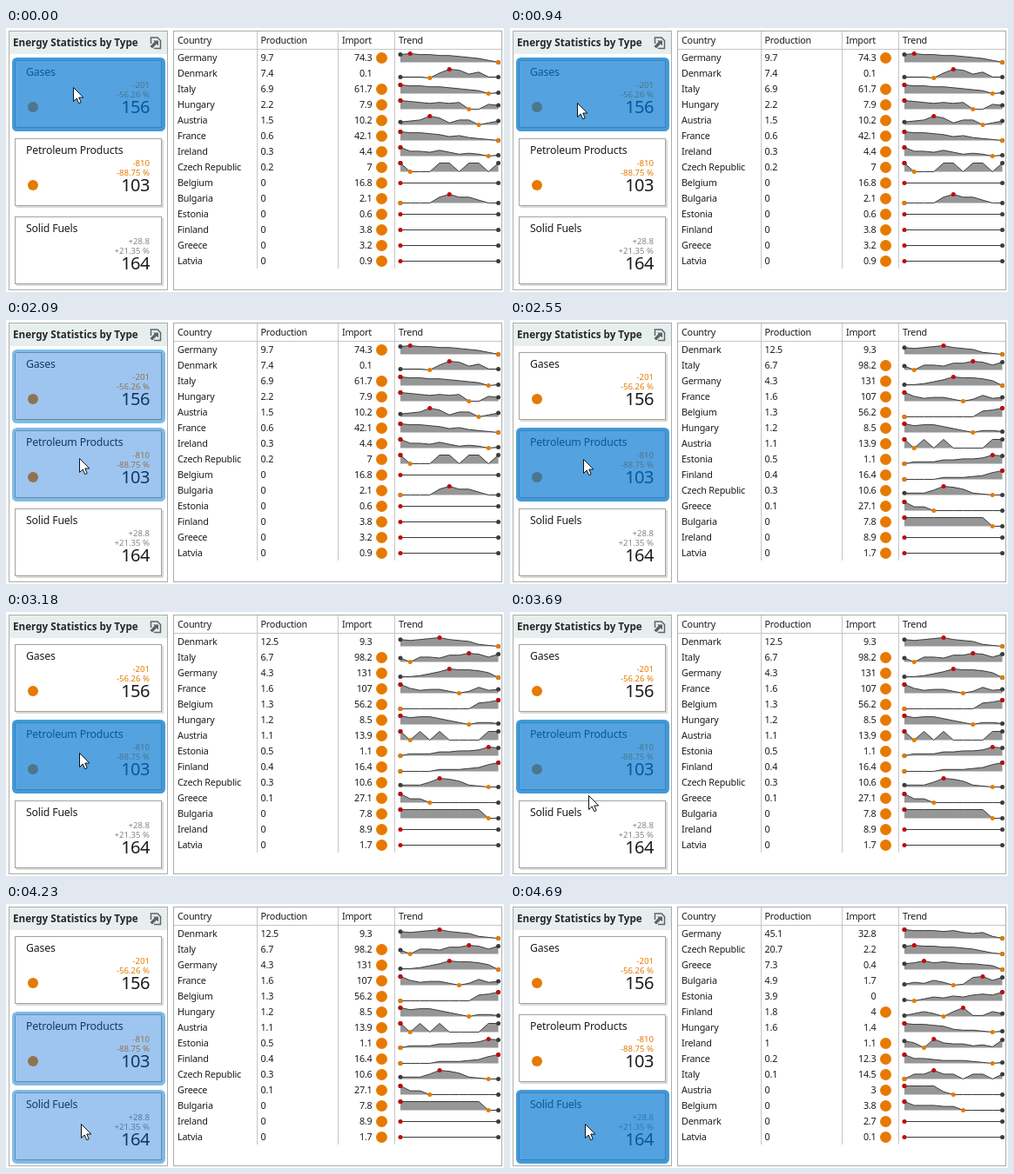
An HTML page for the animation above (6.39 s loop, 572 by 304 pixels).

```html
<!DOCTYPE html>
<html lang="en">
<head>
<meta charset="utf-8">
<title>Energy Statistics by Type</title>
<style>
  html, body { margin: 0; width: 100%; height: 100%; overflow: hidden; background: #fff; }
  svg { display: block; }
  text { font: 10.8px "Noto Sans", "Open Sans", sans-serif; letter-spacing: -.22px; fill: #1c1c1c; }
  .end { text-anchor: end; }
  .head { font-size: 11.65px; font-weight: bold; letter-spacing: 0; fill: #262829; }
  .name { font-size: 12.3px; letter-spacing: -.18px; }
  .delta { font-size: 9.6px; letter-spacing: 0; }
  .total { font-size: 20px; letter-spacing: -.5px; }
  .grid { fill: none; stroke: #c6c6c6; shape-rendering: crispEdges; }
  .panel { fill: none; stroke: #a9adab; shape-rendering: crispEdges; }
</style>
</head>
<body>
<svg id="stage" width="572" height="304" viewBox="0 0 572 304"></svg>
<script>
const LOOP = 6390, ORANGE = '#e67a00', RED = '#c00b0b', DARK = '#3b3b3b';

const cards = [
  ['Gases', '-201', '-56.26 %', 156],
  ['Petroleum Products', '-810', '-88.75 %', 103],
  ['Solid Fuels', '+28.8', '+21.35 %', 164],
];

// country | production | import (* = marked) | trend, one digit per year
const tables = [`
Germany|9.7|74.3*|89887765420
Denmark|7.4|0.1|11105984611
Italy|6.9|61.7*|98877654301
Hungary|2.2|7.9*|98767670054
Austria|1.5|10.2*|34597255024
France|0.6|42.1*|98876453210
Ireland|0.3|4.4*|95546423201
Czech Republic|0.2|7*|90009909909
Belgium|0|16.8*|
Bulgaria|0|2.1*|00006966300
Estonia|0|0.6*|
Finland|0|3.8*|
Greece|0|3.2*|
Latvia|0|0.9*|`, `
Denmark|12.5|9.3|76789765210
Italy|6.7|98.2*|40554779858
Germany|4.3|131*|11246988750
France|1.6|107*|95344202634
Belgium|1.3|56.2*|00000000679
Hungary|1.2|8.5*|97886420221
Austria|1.1|13.9*|90909000099
Estonia|0.5|1.1*|02224455698
Finland|0.4|16.4*|00002223479
Czech Republic|0.3|10.6*|22259862100
Greece|0.1|27.1*|94400000000
Bulgaria|0|7.8*|99999999900
Ireland|0|8.9*|
Latvia|0|1.7*|`, `
Germany|45.1|32.8|98887865620
Czech Republic|20.7|2.2|89887765310
Greece|7.3|0.4|67978766540
Bulgaria|4.9|1.7|13253018958
Estonia|3.9|0|10243546769
Finland|1.8|4*|13530591153
Hungary|1.6|1.4|98876322101
Ireland|1|1.1*|75095442318
France|0.2|12.3*|95543332101
Italy|0.1|14.5*|05595505505
Austria|0|3*|99993000000
Belgium|0|3.8*|95554400000
Denmark|0|2.7*|
Latvia|0|0.1*|`];

// cursor path: time, x, y
const path = [
  [730, 77, 68], [1390, 79, 128], [2030, 84, 158], [2090, 84, 160],
  [3150, 84, 160], [3690, 90, 211], [3810, 90, 223], [4230, 86, 253],
];

const text = (x, y, s, cls = '', fill = '') =>
  `<text x="${x}" y="${y}" class="${cls}"${fill && ` style="fill:${fill}"`}>${s}</text>`;
const dot = (x, y, r, fill) => `<circle cx="${x}" cy="${y}" r="${r}" fill="${fill}"/>`;
const rect = (x, y, w, h, attrs) => `<rect x="${x}" y="${y}" width="${w}" height="${h}" ${attrs}/>`;

function trend(digits, mid) {
  const px = i => 453 + i * 11.25;
  if (!digits) {
    return `<path d="M453 ${mid + .5}H565.5" stroke="${DARK}"/>` +
      dot(453, mid + .5, 2.5, RED) + dot(565.5, mid + .5, 2.5, DARK);
  }
  const v = [...digits].map(Number), base = mid + 5.5;
  const py = i => base - v[i] * 10 / 9;
  const line = v.map((_, i) => `${px(i)} ${py(i).toFixed(1)}`).join('L');
  const marks = [[0, DARK], [10, DARK],
    [v.indexOf(Math.min(...v)), ORANGE], [v.indexOf(Math.max(...v)), RED]];
  return `<path d="M453 ${base}L${line}V${base}Z" fill="#969696"/>` +
    `<path d="M${line}" fill="none" stroke="${DARK}"/>` +
    marks.map(([i, c]) => dot(px(i), py(i), 2.5, c)).join('');
}

function row(line, i) {
  const [country, made, bought, digits] = line.split('|'), mid = 34 + 18 * i;
  return text(197, mid + 4, country) + text(292.5, mid + 4, made) +
    text(420.5, mid + 4, bought.replace('*', ''), 'end') +
    (bought.includes('*') ? dot(431.5, mid + .5, 6.5, ORANGE) : '') + trend(digits, mid);
}

function card([name, delta, percent, total], i) {
  const y = 37 + 90 * i, fall = delta[0] === '-', tone = fall ? ORANGE : '#858585';
  return rect(12, y + 2, 169, 78, 'fill="#dad9d3"') +
    rect(10.5, y + .5, 168, 77, 'fill="#fff" stroke="#a3a3a0"') +
    text(23, y + 18, name, 'name') +
    text(165, y + 31.5, delta, 'delta end', tone) +
    text(165, y + 42.5, percent, 'delta end', tone) +
    text(165, y + 61, total, 'total end') +
    (fall ? dot(31, y + 54, 6, ORANGE) : '') +
    `<g class="glow">${rect(10, y, 170, 79, '')}` +
    `${rect(8.5, y - 1.5, 173, 82, 'rx="4" fill="none" stroke-width="3"')}</g>`;
}

stage.innerHTML =
  rect(4, 4, 181, 26, 'fill="#e7efee"') +
  rect(3.5, 3.5, 182, 298, 'class="panel"') +
  text(8, 21, 'Energy Statistics by Type', 'head') +
  `<path d="M166.500 18V11h7.500l3.500 3.500V23.500H170" fill="none" stroke="#5f6466" stroke-width="1.5"/>
   <path d="M169 14.500h6v6l-2-2-5 5-2.500-2.500 5-5Z" fill="#5f6466"/>` +
  cards.map(card).join('') +
  rect(192.5, 3.5, 377, 298, 'class="panel"') +
  '<path class="grid" d="M193 24.500H569M288.500 4V277M381.500 4V277M446.500 4V277"/>' +
  text(197, 18, 'Country') + text(292.5, 18, 'Production') +
  text(386, 18, 'Import') + text(451, 18, 'Trend') +
  tables.map(t => `<g class="table">${t.trim().split('\n').map(row).join('')}</g>`).join('') +
  `<path id="cursor" d="M.5 .5V16.500L4.200 13 6.700 18.700 9.200 17.600 6.800 12H11.800Z"
    fill="#fff" stroke="#111"/>`;

const glows = document.querySelectorAll('.glow');
const groups = document.querySelectorAll('.table');

function cursorAt(t) {
  const n = path.findIndex(p => p[0] > t);
  if (n < 0) return path.at(-1).slice(1);
  if (!n) return path[0].slice(1);
  const a = path[n - 1], b = path[n], k = (t - a[0]) / (b[0] - a[0]);
  return [1, 2].map(j => Math.floor(a[j] + (b[j] - a[j]) * k));
}

function draw() {
  const t = performance.now() % LOOP;
  const active = t < 2550 ? 0 : t < 4690 ? 1 : 2;
  const [x, y] = cursorAt(Math.floor(t / 30) * 30);
  cursor.setAttribute('transform', `translate(${x} ${y})`);
  groups.forEach((g, i) => g.style.display = i === active ? '' : 'none');
  glows.forEach((g, i) => {
    const top = 37 + 90 * i, hover = y > top + 2 && y < top + 85, both = hover && i === active;
    g.style.display = hover || i === active ? '' : 'none';
    g.children[0].style.fill = both ? 'rgba(0,117,208,.67)' : 'rgba(0,104,214,.38)';
    g.children[1].style.stroke = both ? '#429bd9' : '#7dbde7';
  });
  requestAnimationFrame(draw);
}
draw();
</script>
</body>
</html>
```
